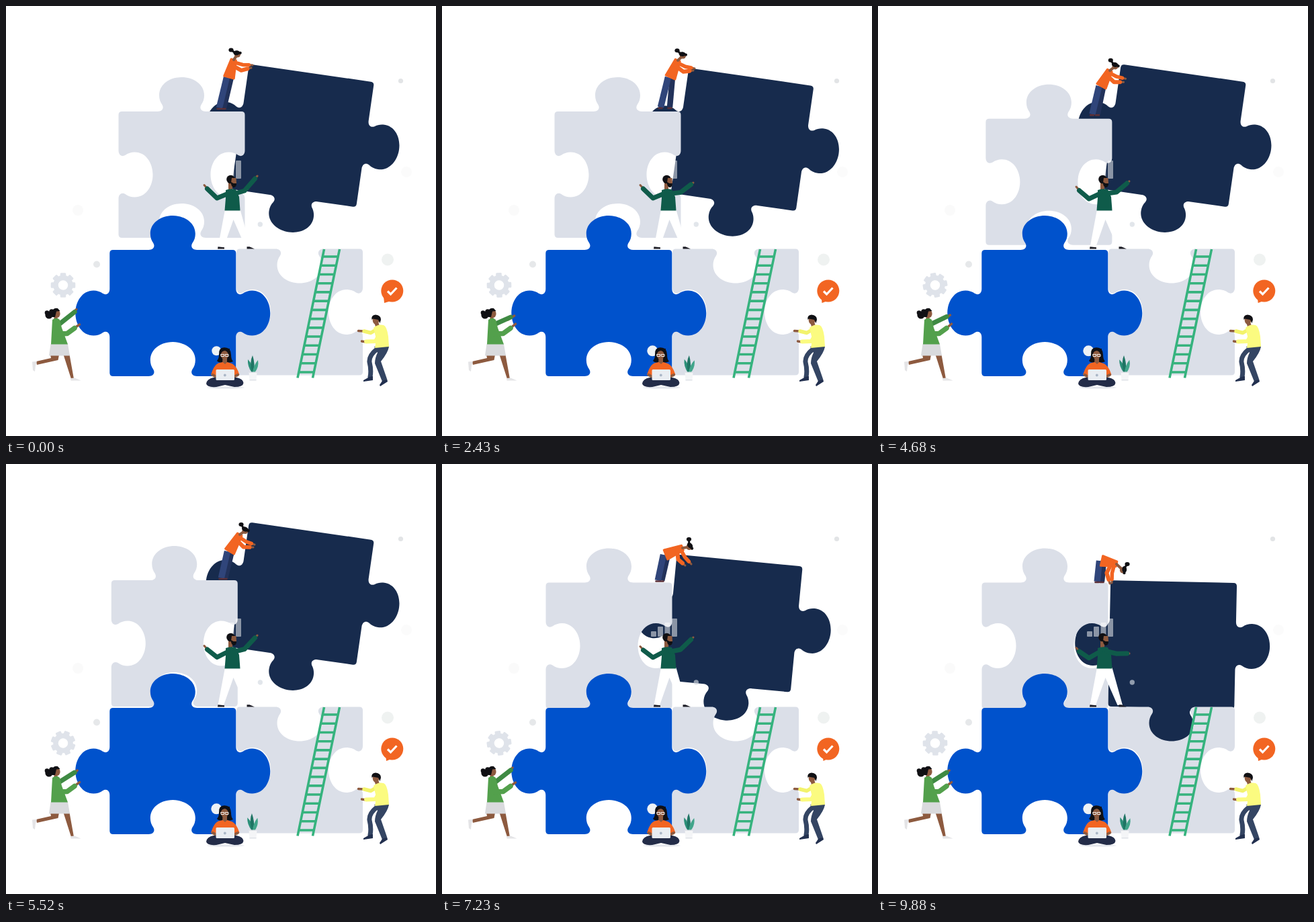
Animation, 640 px wide and 640 px high, one loop 9920 ms. Source, as an HTML page:

```html
<!DOCTYPE html>
<html lang="en">
<head>
<meta charset="utf-8">
<title>Puzzle team</title>
<style>
html, body { margin: 0; width: 100%; height: 100%; overflow: hidden; background: #fff; }
svg { display: block; width: 100vw; height: 100vh; }
.skin { fill: #8d5a3f; }
.hair { fill: #101014; }
.line { fill: none; stroke-linecap: round; stroke-linejoin: round; }
.hand { stroke: #8d5a3f; }
</style>
</head>
<body>
<svg viewBox="0 0 640 640">
  <g id="dots">
    <circle cx="587.5" cy="111.5" r="3.6" fill="#e2e4e6"/>
    <circle cx="568" cy="377.5" r="9" fill="#eff2f1"/>
    <circle cx="135" cy="384.5" r="5" fill="#e6e8ea"/>
    <circle cx="107" cy="304" r="8" fill="#fafafa"/>
    <circle cx="596" cy="247" r="8" fill="#fbfbfb"/>
  </g>
  <g id="gear" fill="#dfe3ea"></g>

  <path id="navy" fill="#172b4d"/>
  <path id="grey" fill="#dbdfe8"/>
  <path id="base" fill="#dbdfe8" transform="translate(437 455.5)"/>
  <path id="blue" fill="#0052cc" transform="translate(248.3 457)"/>

  <g fill="#fff" opacity=".5">
    <rect x="311" y="249" width="8" height="8" rx="1"/>
    <rect x="321" y="242" width="8" height="15" rx="1"/>
    <rect x="331.500" y="236" width="8" height="21" rx="1"/>
    <rect x="342" y="230" width="8" height="27" rx="1"/>
  </g>
  <circle cx="378.300" cy="325" r="3.7" fill="#d3d9e0" opacity=".65"/>

  <g id="ladder" class="line" stroke="#36b37e" stroke-width="3.6" style="stroke-linecap:butt"></g>

  <!-- climber -->
  <g class="line">
    <path id="legB" stroke="#22325a" stroke-width="8.500" style="stroke-linecap:butt"/>
    <path id="legA" stroke="#30457a" stroke-width="9.500" style="stroke-linecap:butt"/>
    <path id="shoes" stroke="#5b3038" stroke-width="2.600"/>
  </g>
  <path id="torso" fill="#f26522" stroke="#f26522" stroke-width="3" stroke-linejoin="round"/>
  <g class="line">
    <path id="wristA" class="hand" stroke-width="3"/>
    <path id="sleeveA" stroke="#f26522" stroke-width="5.500"/>
    <path id="wristB" class="hand" stroke-width="3"/>
    <path id="sleeveB" stroke="#f26522" stroke-width="6"/>
  </g>
  <path id="neck" class="line hand" stroke-width="4"/>
  <circle id="face" class="skin" r="4.600"/>
  <g id="hair" class="hair">
    <ellipse cx="-1" cy="-2.300" rx="5" ry="3.400"/>
    <circle cx="4.300" cy="-1.800" r="2.100"/>
  </g>
  <path id="tail" class="line" stroke="#101014" stroke-width="3"/>
  <ellipse id="bun" class="hair" rx="3.600" ry="3"/>

  <!-- centre man -->
  <path fill="#fff" d="M326 303H348.500L364 359H356.500L338.500 318L324 359H315.500Z"/>
  <path fill="#1d1d26" d="M315.500 358.300L325 359.300V361.500H315ZM358.500 358.300L362.500 358.200L370 361.500H358.500Z"/>
  <path class="line hand" d="M334 264V273" stroke-width="6"/>
  <path fill="#0f5b4a" d="M327 274Q334 271 342 273L347 284L348.500 304.500H325.500L327 286Z"/>
  <g class="line">
    <path id="reachL" class="hand" stroke-width="3"/>
    <path id="reachR" class="hand" stroke-width="3"/>
    <path id="armL" stroke="#0f5b4a" stroke-width="7"/>
    <path id="armR" stroke="#0f5b4a" stroke-width="7"/>
  </g>
  <circle class="hair" cx="334.500" cy="258" r="6.300"/>
  <path class="skin" d="M336 256H342.500L343 264L339 267L335 263Z"/>
  <path class="hair" d="M335 262L338.500 264L343 264Q343 270 338.500 270Q334.500 268 335 262Z"/>

  <!-- pushing woman -->
  <path class="skin" d="M66 519H79L77.500 527L46 534L45 529L67 524ZM85.500 519H94.500L101 555H97Z"/>
  <path fill="#e4e4e6" d="M39 529.500L46 529L44 535L43 544L40 542ZM96 554L102 553.500Q106 555 111.500 557.500H96.500Z"/>
  <path fill="#d9dadd" d="M66.500 503H92L95 520.500H64Z"/>
  <path class="line hand" d="M74 460V467" stroke-width="5"/>
  <g class="line">
    <path id="pushHandA" class="hand" stroke-width="3.500"/>
    <path id="pushA" stroke="#3f8a43" stroke-width="7"/>
  </g>
  <path fill="#53a04c" d="M69 467Q75 462 80 467L83 479L92 503.500H67Z"/>
  <g class="line">
    <path id="pushHandB" class="hand" stroke-width="3.500"/>
    <path id="pushB" stroke="#53a04c" stroke-width="7.500"/>
  </g>
  <ellipse class="skin" cx="76" cy="458" rx="4.600" ry="6"/>
  <path class="hair" d="M68 455Q71 448.500 77 450L80.500 454L75 454.500L73 463L69 463Z"/>
  <circle class="hair" cx="64" cy="460" r="5.600"/>
  <circle class="hair" cx="61" cy="456.500" r="3.300"/>
  <circle class="hair" cx="68" cy="455" r="3.800"/>

  <!-- guiding man -->
  <g class="line">
    <path class="hand" d="M524.500 483.500L532 484M529.500 499L536 500" stroke-width="3.400"/>
    <path stroke="#f3f36c" d="M533 484L543 486.500L552 481" stroke-width="5.500"/>
    <path stroke="#344563" d="M553 510Q540 520 541 530Q544 542 542 552" stroke-width="7"/>
  </g>
  <path fill="#344563" d="M548 507L570 505.500Q570 514 558 529L567 555L560 559L549 532Q549 524 553 516Z"/>
  <path fill="#22304f" d="M541 552L546 551L546 557L532 559L532 557ZM560 558L567 555L568 559L557 566L556 564Z"/>
  <path class="line hand" d="M551 470L553 477" stroke-width="6"/>
  <path fill="#fbfb80" d="M547 479Q553 473 562 475Q567 477 569 492L570 507L549 509L551 496Z"/>
  <path class="line" stroke="#fbfb80" d="M536 499.500L550 499L556 488" stroke-width="6"/>
  <ellipse class="skin" cx="550.500" cy="467.500" rx="4.800" ry="6.500"/>
  <path class="hair" d="M544.500 467Q543 460 550 459.500Q558 460 558 467L556.500 472L554 467L546 465.500Z"/>

  <!-- approval -->
  <path id="tip" fill="#f26522"/>
  <circle cx="574.800" cy="424" r="16.500" fill="#f26522"/>
  <path class="line" d="M568 424.500L572.500 429L581.500 419.500" stroke="#fff" stroke-width="3.200" style="stroke-linecap:butt;stroke-linejoin:miter"/>

  <!-- laptop woman -->
  <circle cx="313.300" cy="513.300" id="bubble" fill="#eef2f5"/>
  <ellipse cx="327" cy="568" rx="28" ry="1.500" fill="#e3e6ec"/>
  <path class="hair" d="M317 519Q316 508.500 325 508.300Q335 508.500 335 519Q335 526 338 529Q333 532 326 530Q317 532 314 528Q317 525 317 519Z"/>
  <path class="skin" d="M322.500 523H329V532L326 535L322 532Z"/>
  <path fill="#f26522" d="M305 549Q309 535 316 531.500L322.500 530L326 533L329.500 530L337 532.500Q344 537 347.500 549L341 551H311Z"/>
  <path class="line hand" d="M307.500 549L313 552M345 549L339 552" stroke-width="4"/>
  <ellipse class="skin" cx="325.300" cy="519.500" rx="5.600" ry="6.500"/>
  <path class="hair" d="M319 519Q320 512 327 513Q331 514 332 519L333 510L321 509Z"/>
  <path class="line" stroke="#fff" stroke-width=".9" d="M320 518.500h4.500v3H320.500ZM326.500 518.500h4.500v3H327Z"/>
  <path fill="#232c48" d="M298 562Q299 555 309 553H343Q353 555 353.500 561Q353 567 340 567L326 564L313 567Q299 568 298 562Z"/>
  <rect x="312.500" y="541" width="27.500" height="16" rx="1.500" fill="#e9edf2"/>
  <circle cx="325.800" cy="549.500" r="1.900" fill="#aab6c6"/>

  <!-- plant -->
  <g id="plant">
    <path fill="#2b8f78" d="M366 546Q359 536 360 526Q368 534 368 546Z"/>
    <path fill="#1f7564" d="M366 546Q362 530 367 520Q371 532 369 546Z"/>
    <path fill="#42a58b" d="M367 546Q368 535 375 527Q377 537 370 546Z"/>
  </g>
  <path fill="#f4f5f7" d="M361.500 545H373.500L372.500 557H362.500Z"/>
  <path fill="#dfe2e7" d="M361.500 544.500H373.500V546H361.500ZM362.500 556H372.500V557.500H362.500Z"/>
</svg>

<script>
const LOOP = 9920;
const $ = id => document.getElementById(id);
const put = (id, attrs) => { for (const k in attrs) $(id).setAttribute(k, attrs[k]); };
const draw = (id, d) => $(id).setAttribute('d', d);
const clamp = x => Math.min(1, Math.max(0, x));
const ease = (t, a, b) => (1 - Math.cos(Math.PI * clamp((t - a) / (b - a)))) / 2;
const mix = (a, b, k) => a.map((v, i) => v + (b[i] - v) * k);
const add = (p, x, y) => [p[0] + x, p[1] + y];

// Square piece; each side is 1 knob, -1 socket, 0 flat (top, right, bottom, left)
function piece(sides) {
  const H = 94, R = 89;
  const knob = [[-36, 0], [-29, 0], [-26, 5], [-29, 10], [-32, 14], [-33.5, 19], [-33.5, 24], [-33.5, 41], [-17, 51], [0, 51]];
  const full = knob.concat(knob.slice(0, -1).reverse().map(([u, v]) => [-u, v]));
  let d = '';
  sides.forEach((dir, k) => {
    const at = (u, v) => {
      let p = [u, -H - v * dir];
      for (let i = 0; i < k; i++) p = [-p[1], p[0]];
      return p.join(' ');
    };
    d += (k ? 'L' : 'M') + at(-R, 0);
    if (dir) {
      const pts = full.map(p => at(...p));
      d += 'L' + pts[0] + 'C' + pts.slice(1).join(' ');
    }
    d += 'L' + at(R, 0) + 'Q' + at(H, 0) + ' ';
    const end = [H, -R];
    let p = end;
    for (let i = 0; i < k; i++) p = [-p[1], p[0]];
    d += p.join(' ');
  });
  return d + 'Z';
}

// Smooth monotone interpolation through keyed values
function track(times, vals) {
  const n = times.length;
  const slope = times.slice(1).map((t, i) => (vals[i + 1] - vals[i]) / (t - times[i]));
  const m = vals.map((_, i) => {
    const a = slope[i - 1], b = slope[i];
    return i && i < n - 1 && a * b > 0 ? 2 * a * b / (a + b) : 0;
  });
  return t => {
    if (t >= times[n - 1]) return vals[n - 1];
    let i = 0;
    while (t >= times[i + 1]) i++;
    const h = times[i + 1] - times[i], s = (t - times[i]) / h, r = 1 - s;
    return vals[i] * (1 + 2 * s) * r * r + vals[i + 1] * s * s * (3 - 2 * s)
      + h * s * r * (m[i] * r - m[i + 1] * s);
  };
}
const beats = [0, 1030, 2430, 3830, 5520, 6100, 7230, 8600];
const joint = (xs, ys) => {
  const x = track(beats, xs), y = track(beats, ys);
  return t => [x(t), y(t)];
};

const body = {
  bun: joint([335, 347, 350, 343.5, 350, 351, 367.5, 371], [65.5, 66.3, 66.3, 70, 90, 90.5, 112, 149]),
  head: joint([344.5, 356, 358.5, 351, 356, 357, 368, 364.5], [72, 74, 74, 78.5, 99.5, 100, 123.5, 158]),
  neck: joint([339, 349, 351, 343, 348, 349, 358, 355], [80, 81, 81, 86, 105, 106, 125, 149]),
  hip: joint([332, 341, 340, 332, 333, 333, 333, 333], [106, 107, 106, 109, 130, 132, 135, 144]),
  footA: joint([317, 326, 325, 317, 320, 320, 321, 326], [153, 152, 152, 155, 171, 174, 174.5, 176]),
  footB: joint([324, 335, 339, 328, 326, 326, 327, 333], [153, 152, 152, 155, 171, 174, 174.5, 176]),
  handA: joint([367, 377, 376, 367, 370, 370, 371, 348], [88, 90, 93, 96, 120, 121, 149, 177]),
  handB: joint([365, 373, 374, 363, 368, 368, 362, 345], [92, 95, 96, 101, 124, 125, 151, 178])
};
const span = [0, 1030, 2430, 3830, 5520, 7230, 9030, 9880];
const reachL = track(span, [267, 267, 267, 268, 271, 272, 273, 274]);
const reachR = track(span, [253, 256, 263, 267, 255, 258, 277, 282]);
const push = track(span, [451.5, 455, 461, 463, 456, 452, 454, 456]);
const tipX = track(span, [563, 565.5, 565.5, 565.5, 566, 567.5, 566, 566]);

draw('navy', piece([0, 1, 1, 1]));
draw('grey', piece([1, -1, -1, -1]));
draw('base', piece([-1, -1, 0, -1]));
draw('blue', piece([1, 1, -1, 1]));

let rungs = 'M473.500 362L434 553.500M496.500 362L456.500 553.500';
for (let i = 0; i < 14; i++) {
  const y = 373 + i * 13.23, x = 473.5 - (y - 362) * .207;
  rungs += `M${x} ${y}h23`;
}
$('ladder').innerHTML = `<path d="${rungs}"/>`;

let teeth = '<circle r="11" fill="none" stroke="#dfe3ea" stroke-width="7.500"/>';
for (let i = 0; i < 8; i++)
  teeth += `<rect x="-4.300" y="-18.300" width="8.600" height="6" rx="1.500" transform="rotate(${i * 45})"/>`;
$('gear').innerHTML = teeth;

// Sleeve from shoulder to just before the hand
function arm(sleeve, wrist, from, to, bend) {
  const mid = mix(from, to, .5);
  const elbow = [mid[0] - (to[1] - from[1]) * bend, mid[1] + (to[0] - from[0]) * bend];
  const cuff = mix(elbow, to, .62);
  draw(sleeve, `M${from}L${elbow}L${cuff}`);
  draw(wrist, `M${cuff}L${to}`);
}

function climber(t) {
  const p = {};
  for (const k in body) p[k] = body[k](t);
  const { head, neck, hip } = p;
  const dx = neck[0] - hip[0], dy = neck[1] - hip[1], len = Math.hypot(dx, dy);
  const side = (c, w) => [c[0] - dy / len * w, c[1] + dx / len * w];
  draw('torso', `M${side(neck, -4)}L${side(neck, 3.5)}L${side(hip, 7.5)}L${side(hip, -7.5)}Z`);
  draw('legA', `M${add(hip, -3.5, 0)}L${mix(hip, p.footA, .97)}`);
  draw('legB', `M${add(hip, 3, 0)}L${mix(hip, p.footB, .97)}`);
  draw('shoes', `M${add(p.footA, -2.5, 0)}h5M${add(p.footB, -2.5, 0)}h5`);
  arm('sleeveA', 'wristA', mix(neck, hip, .13), p.handA, .06);
  arm('sleeveB', 'wristB', mix(neck, hip, .32), p.handB, .2);
  draw('neck', `M${neck}L${head}`);
  put('face', { cx: head[0], cy: head[1] });
  const lean = Math.atan2(p.bun[1] - head[1], p.bun[0] - head[0]) * 180 / Math.PI + 142;
  put('hair', { transform: `translate(${head}) rotate(${lean})` });
  draw('tail', `M${p.bun}L${mix(p.bun, head, .7)}`);
  put('bun', { cx: p.bun[0], cy: p.bun[1] });
}

function pieces(t) {
  const nudge = t < 3400 ? Math.sin(Math.PI * t / 3400) ** 2 * 9 : 0;
  const e = ease(t, 5900, 8600);
  const x = 441.5 + nudge - 3.3 * e - 23 * e * (1 - e);
  const y = 193 + nudge * 1.05 + 76 * e ** .76;
  put('navy', { transform: `translate(${x} ${y}) rotate(${8.2 - 7 * e ** 1.33})` });
  const g = ease(t, 2400, 6700);
  put('grey', { transform: `translate(${261.5 - 13 * g} ${251 + 19.5 * g})` });
}

function helpers(t) {
  const l = reachL(t), r = reachR(t), u = push(t);
  draw('armL', `M331 279L314 ${286 + (l - 267) * .4}L299.500 ${l + 5}`);
  draw('reachL', `M299 ${l + 4}L295 ${l - .5}`);
  const ex = 355, ey = 275 + (r - 253) * .25;
  const cuff = mix([ex, ey], [374, r], .82);
  draw('armR', `M341 279L${ex} ${ey}L${cuff}`);
  draw('reachR', `M${cuff}L374 ${r}`);
  draw('pushA', `M80 473L${mix([80, 473], [107, u], .82)}`);
  draw('pushHandA', `M98 ${u + 6}L${105 + (u - 452) * .3} ${u}`);
  draw('pushB', 'M78 488L91 487.500L102 479.500');
  draw('pushHandB', `M103 478.500L109.500 ${474 - (u - 452) * .1}`);
}

function frame(now) {
  const t = now % LOOP;
  pieces(t);
  climber(t);
  helpers(t);
  put('gear', { transform: `translate(85 415.500) rotate(${t / LOOP * 360})` });
  put('bubble', { r: 7 + clamp(t / 800) });
  put('plant', { transform: `rotate(${Math.sin(t / 1100) * 2.5} 367 546)` });
  draw('tip', `M${tipX(t) - 1} 432L${tipX(t)} 442L576 438Z`);
  requestAnimationFrame(frame);
}
frame(performance.now());
</script>
</body>
</html>
```
